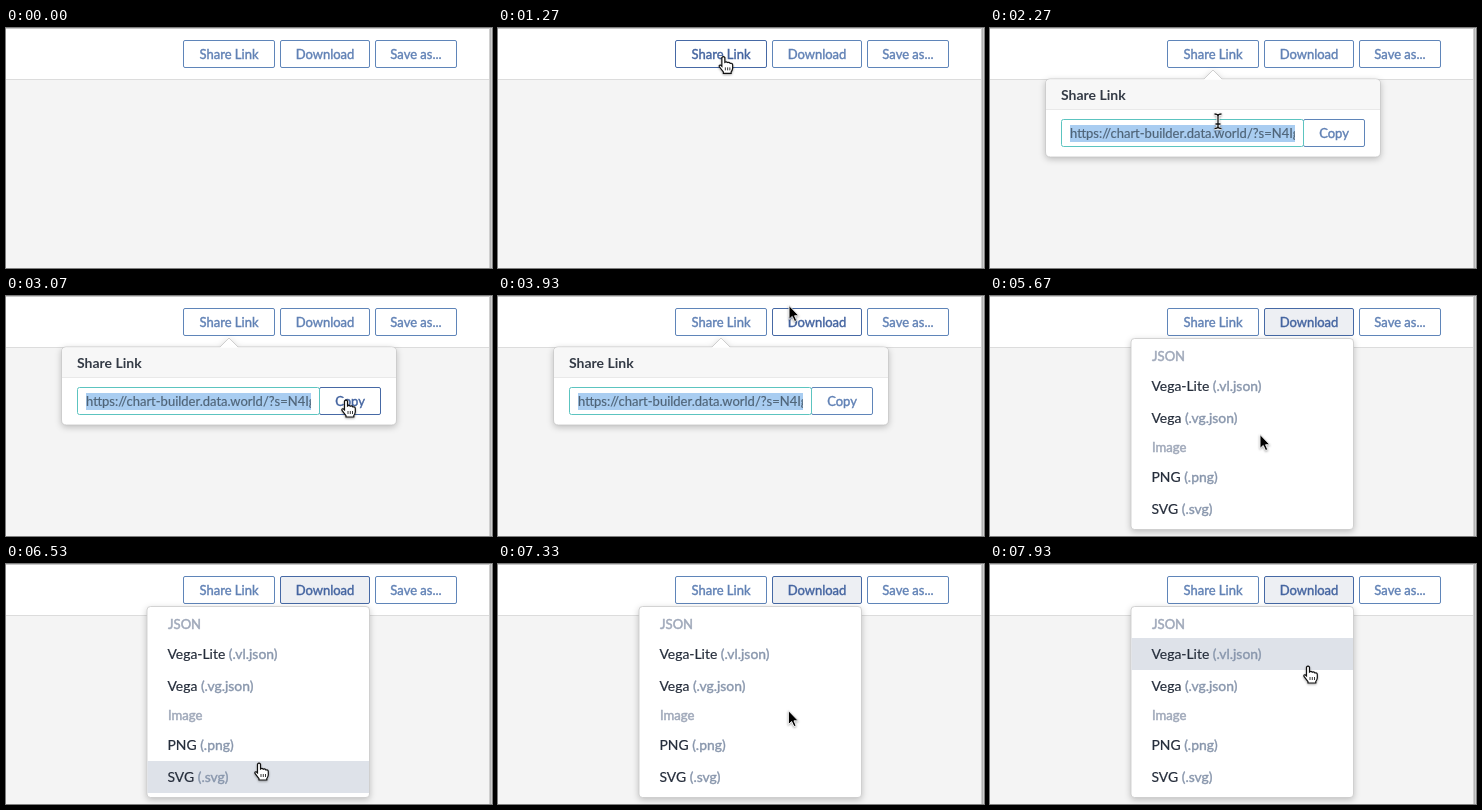
Animation, 486 px wide and 240 px high, one loop 8 s. Source, as an HTML page:

```html
<!DOCTYPE html>
<html lang="en">
<head>
<meta charset="utf-8">
<title>Share and download</title>
<style>
  html, body { margin: 0; width: 100%; height: 100%; overflow: hidden; background: #f4f4f4; }
  svg { display: block; width: 486px; height: 240px; }
  text { font: 13.9px Lato, sans-serif; fill: #252d3b; stroke: #252d3b; stroke-width: .2; white-space: pre; }
  .button rect { fill: #fff; stroke: #5f85b9; }
  .button text { font-size: 13px; fill: #6081b5; stroke: #6081b5; stroke-width: .4; text-anchor: middle; }
  .button.hover rect, .button.active rect { stroke: #4669a5; }
  .button.hover text, .button.active text { fill: #4464a0; stroke: #4464a0; }
  .button.active rect { fill: #edeff3; }
  .title { font-size: 14px; font-weight: 700; fill: #333a45; stroke: none; }
  .url { font-size: 13px; fill: #4f6478; stroke: #4f6478; }
  .label { font-size: 13.1px; fill: #a0a9ba; stroke: #a0a9ba; stroke-width: .5; }
  .type { fill: #8896ac; stroke: #8896ac; stroke-width: .4; }
  .row rect { fill: none; }
  .row.hover rect { fill: #dee2e9; }
  .panel { filter: drop-shadow(0 2px 3px rgba(0, 0, 0, .22)); }
  .field { fill: #fff; stroke: #5cc4c0; }
  .blurred .field { stroke: #c4ccd6; }
  .blurred .selection { display: none; }
  #cursor { filter: drop-shadow(0 1px 1px rgba(0, 0, 0, .35)); }
</style>
</head>
<body>
<svg viewBox="0 0 486 240">
  <rect width="486" height="240" fill="#f4f4f4"/>
  <rect width="486" height="51" fill="#fff"/>
  <rect y="51" width="484" height="1" fill="#dcdcdc"/>
  <rect width="486" height="1" fill="#c8c8c8"/>
  <rect x="483" width="1" height="240" fill="#d0d0d0"/>
  <rect x="484" width="1" height="240" fill="#b4b4b4"/>
  <rect x="485" width="1" height="240" fill="#cccccc"/>
  <g id="toolbar"></g>

  <g id="menu">
    <rect class="panel" x="141" y="42.5" width="222.5" height="191" rx="3.5" fill="#fff" stroke="#c9c9c9" stroke-width=".8"/>
    <g id="rows"></g>
    <text class="label" x="162" y="65">JSON</text>
    <text class="label" x="162" y="156">Image</text>
  </g>

  <g id="popover">
    <path class="panel" d="M60 51H214L223 42L232 51H385.500Q390.500 51 390.500 56V124Q390.500 129 385.500 129H60.500Q55.500 129 55.500 124V56Q55.500 51 60 51Z" fill="#fff" stroke="#c6c6c6" stroke-width=".8"/>
    <path d="M56 81V56Q56 51.500 60.500 51.500H385.500Q390 51.500 390 56V81Z" fill="#f7f7f7"/>
    <path d="M215 51.500L223 43L231 51.500Z" fill="#fff"/>
    <path d="M56 81.500H390" stroke="#e9e9e9"/>
    <text class="title" x="71" y="72">Share Link</text>
    <g id="copy"></g>
    <rect class="field" x="71.5" y="91.5" width="242" height="27" rx="2"/>
    <rect class="selection" x="80" y="97" width="225" height="17" fill="#a9cdf1"/>
    <clipPath id="clip"><rect x="80" y="92" width="225" height="26"/></clipPath>
    <text class="url" x="80" y="110" clip-path="url(#clip)">https://chart-builder.data.world/?s=N4Ig</text>
  </g>

  <g id="cursor">
    <path id="arrow" transform="translate(0 .5) scale(.9)" d="M0 0V15.500L3.600 12.200L6.200 17.800L8.600 16.800L6.200 11.400H11Z" fill="#000" stroke="#fff"/>
    <g id="hand">
      <path d="M-1.500 1.200Q0-.8 1.500 1.200V6Q3 4.800 4.200 6.200Q5.800 5.400 6.900 7Q9 6.400 9.300 8.600V12Q9 14 7.800 15.500V17H0V15.600L-4 10.400Q-4.600 8.400-2.800 8.800L-1.500 10Z" fill="#fff" stroke="#111" stroke-width="1.200"/>
      <path d="M2 11V14M4.300 11V14M6.500 11V14" stroke="#222" stroke-width=".9"/>
    </g>
    <g id="beam" fill="none">
      <path id="stem" d="M-3.500-7Q0-7 0-5Q0-7 3.500-7M0-5V6M-3.500 7.500Q0 7.500 0 5.500Q0 7.500 3.500 7.500M-2.500 3H2.500"/>
      <use href="#stem" stroke="#fff" stroke-width="3"/>
      <use href="#stem" stroke="#111" stroke-width="1.300"/>
    </g>
  </g>
</svg>
<script>
const LOOP = 8000, HOVER_LAG = 60;
const POPOVER_IN = 1600, MENU_OPEN = 4450;
const $ = id => document.getElementById(id);

// Pointer path: time, x, y
const path = [
  [350, 262, 262], [870, 228, 31], [1070, 228, 31], [1400, 224, 27],
  [1850, 224, 27], [2200, 228, 93], [2470, 228, 93], [2850, 340, 104],
  [3180, 340, 104], [3330, 330, 60], [3470, 312, 50], [3800, 296, 26],
  [3930, 291, 9], [4030, 291, 10], [4270, 297, 27], [5130, 297, 27],
  [5560, 270, 138], [5720, 270, 138], [6000, 258, 195], [6200, 253, 199],
  [6950, 253, 199], [7250, 288, 150], [7700, 316, 104], [7900, 318, 102]
];

const targets = [];

function addTarget(parent, kind, x, y, w, h, label, visible) {
  $(parent).insertAdjacentHTML("beforeend",
    `<g class="${kind}"><rect x="${x}" y="${y}" width="${w}" height="${h}"/>${label}</g>`);
  const target = { el: $(parent).lastElementChild, x, y, w, h, visible, shape: "hand" };
  targets.push(target);
  return target;
}

function addButton(parent, x, y, w, label, visible) {
  const text = `<text x="${x + w / 2}" y="${y + 18.5}">${label}</text>`;
  const target = addTarget(parent, "button", x, y, w, 27, text, visible);
  target.el.firstChild.setAttribute("rx", 1.5);
  return target;
}

const always = () => true;
const menuOpen = t => t >= MENU_OPEN;
const popoverOpen = t => t >= POPOVER_IN && t < MENU_OPEN;

addButton("toolbar", 177.5, 12.5, 91, "Share Link", always);
const download = addButton("toolbar", 274.5, 12.5, 89, "Download", always);
addButton("toolbar", 369.5, 12.5, 81, "Save as...", always);
addButton("copy", 313.5, 91.5, 61, "Copy", popoverOpen);
targets.push({ x: 71, y: 91, w: 242, h: 28, visible: popoverOpen, shape: "beam" });

[["Vega-Lite", ".vl.json", 74], ["Vega", ".vg.json", 106], ["PNG", ".png", 165], ["SVG", ".svg", 197]]
  .forEach(([name, type, y]) => addTarget("rows", "row", 141.5, y, 221.5, 32,
    `<text x="161.5" y="${y + 21}">${name} <tspan class="type">(${type})</tspan></text>`, menuOpen));

const clamp = v => Math.min(1, Math.max(0, v));
const ramp = (t, start, length) => clamp((t - start) / length);

function pointerAt(t) {
  const next = path.findIndex(p => p[0] > t);
  if (next === 0) return path[0].slice(1);
  if (next < 0) return path[path.length - 1].slice(1);
  const [t0, x0, y0] = path[next - 1], [t1, x1, y1] = path[next];
  const u = (t - t0) / (t1 - t0), s = u * u * (3 - 2 * u);
  return [x0 + (x1 - x0) * s, y0 + (y1 - y0) * s];
}

function targetAt(t) {
  const [x, y] = pointerAt(t);
  return targets.find(b => b.visible(t) && x >= b.x && x < b.x + b.w && y >= b.y && y < b.y + b.h);
}

function show(el, on) {
  el.style.display = on ? "" : "none";
}

function render(t) {
  const [x, y] = pointerAt(t);
  const hovered = targetAt(t - HOVER_LAG);
  const under = targetAt(t);
  const shape = under ? under.shape : "arrow";

  for (const target of targets) {
    if (target.el) target.el.classList.toggle("hover", target === hovered);
  }
  download.el.classList.toggle("active", menuOpen(t));
  show($("menu"), menuOpen(t));

  const opacity = ramp(t, POPOVER_IN, 150) * (1 - ramp(t, MENU_OPEN, 170));
  show($("popover"), opacity > 0);
  $("popover").style.opacity = opacity;
  $("popover").classList.toggle("blurred", menuOpen(t));

  $("cursor").setAttribute("transform", `translate(${x} ${y})`);
  for (const id of ["arrow", "hand", "beam"]) show($(id), id === shape);
}

const start = performance.now();
function tick() {
  render((performance.now() - start) % LOOP);
  requestAnimationFrame(tick);
}
tick();
</script>
</body>
</html>
```
